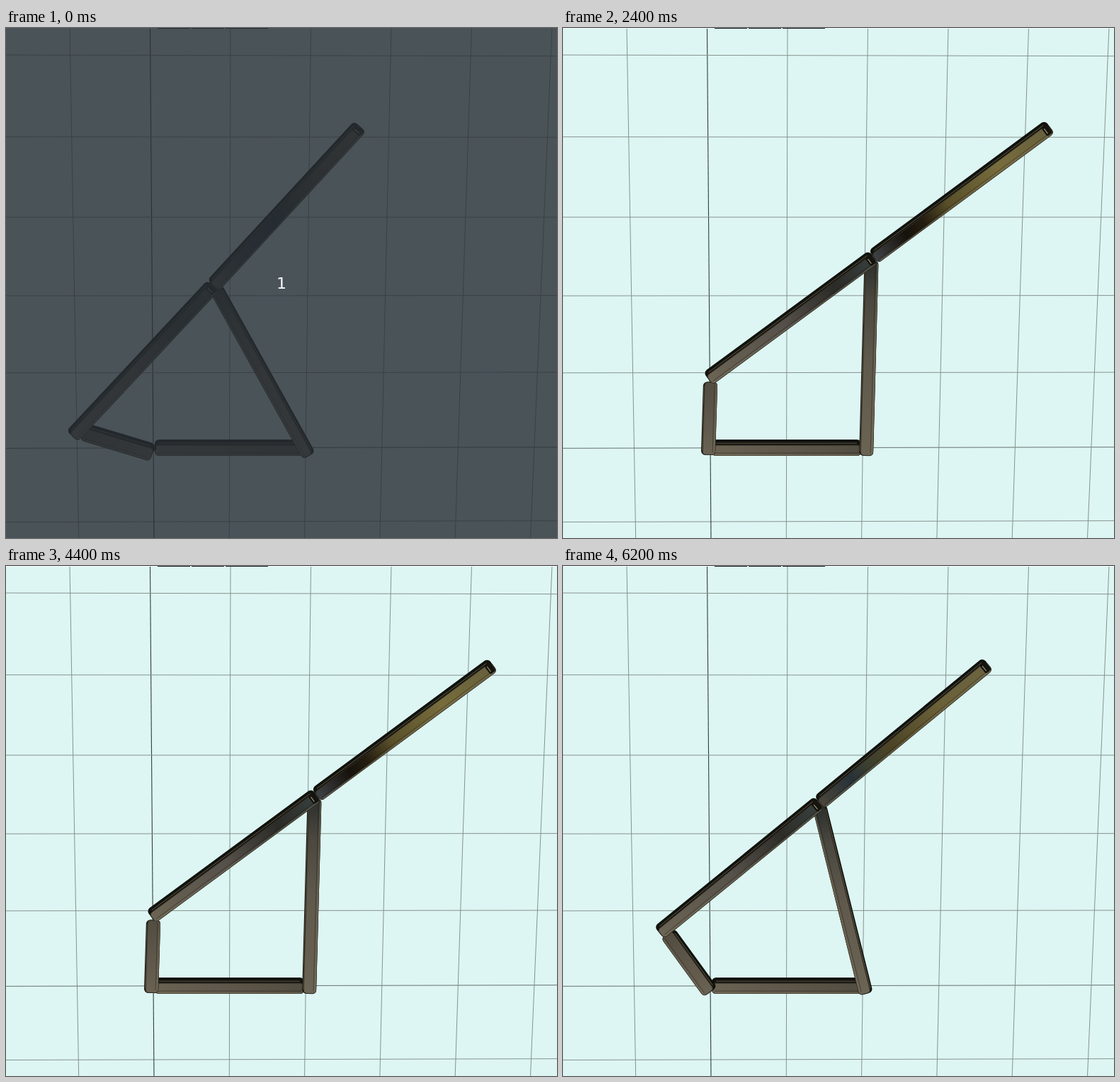
These frames come from a looping animation (778 px wide and 720 px high, 6.3 s). An HTML page:

```html
<!DOCTYPE html>
<html>
<head>
<meta charset="utf-8">
<title>Straight-line linkage</title>
<style>
html, body { margin: 0; width: 100%; height: 100%; overflow: hidden; background: #ddf6f3; }
svg { display: block; width: 778px; height: 720px; }
</style>
</head>
<body>
<svg id="stage" viewBox="0 0 778 720"></svg>
<script>
const NS = "http://www.w3.org/2000/svg";
const stage = document.getElementById("stage");
const LOOP = 6300, STEP = 100, TURN = 2000;

function set(el, attrs) {
  for (const k in attrs) el.setAttribute(k, attrs[k]);
  return el;
}
function add(parent, tag, attrs) {
  return parent.appendChild(set(document.createElementNS(NS, tag), attrs));
}

// Linkage units to stage pixels, on the tilted floor grid
function place([x, y]) {
  const sy = 593 - 105.3 * y - 1.15 * y * y;
  return [203.5 + sy * 5.5 / 720 + x * (113.5 - 7.2 * sy / 720), sy];
}

function drawGrid() {
  add(stage, "rect", { width: 778, height: 720, fill: "#ddf6f3" });
  for (let i = -1; i < 6; i++) {
    const axis = i === 0;
    add(stage, "line", {
      x1: 203.5 + 113.5 * i, y1: 0, x2: 209 + 106.3 * i, y2: 720,
      stroke: axis ? "#353d3d" : "#87928f", "stroke-width": axis ? 1.1 : 1
    });
    const y = place([0, i])[1];
    const tilt = [-1.8, -1.6, -0.8, -0.5, 0, 0.6, 1.6][i + 1];
    add(stage, "line", {
      x1: 0, y1: y + 0.3, x2: 778, y2: y + 0.3 + tilt,
      stroke: axis ? "#66706e" : "#87928f", "stroke-width": 1
    });
  }
  add(stage, "rect", { width: 778, height: 1, fill: "#f3fbfa" });
  for (const x of [214, 262, 310])
    add(stage, "rect", { x, y: 0, width: x === 310 ? 60 : 46, height: 1, fill: "#222" });
}

// A bevelled metal bar: dark upper side, shaded front, optional end cap
class Bar {
  constructor(id, width, stops, { cap = false, outside = false } = {}) {
    Object.assign(this, { width, outside });
    const grad = add(stage, "linearGradient", { id });
    this.stops = stops.map(([offset, color]) =>
      add(grad, "stop", { offset, "stop-color": color }));
    this.g = add(stage, "g", {});
    this.side = add(this.g, "rect", { rx: 6, fill: "#12120d" });
    this.sheen = add(this.g, "line", { stroke: "#6c6654", "stroke-width": 0.8 });
    this.front = add(this.g, "rect", {
      rx: 4.5, fill: `url(#${id})`, stroke: "#302c24", "stroke-width": 1
    });
    this.bevel = add(this.g, "line", { stroke: "#82775f", "stroke-width": 1.2, opacity: 0.7 });
    this.inner = add(this.g, "line", { stroke: "#1d1b16", "stroke-width": 0.8, opacity: 0.55 });
    if (cap) {
      this.cap = add(this.g, "rect", { rx: 3, width: 10, fill: "#15140f" });
      this.glint = add(this.g, "line", { stroke: "#9c9377", "stroke-width": 1.2 });
    }
  }
  move(a, b) {
    const dx = b[0] - a[0], dy = b[1] - a[1], len = Math.hypot(dx, dy);
    const angle = Math.atan2(dy, dx) * 180 / Math.PI;
    const flip = dx < 0 ? -1 : 1;
    const depth = 2 + 6 * Math.abs(dx) / len;
    const bottom = this.width / 2;
    const top = this.outside ? -bottom - depth : -bottom;
    const edge = top + depth;
    set(this.g, { transform: `translate(${a}) rotate(${angle}) scale(1 ${flip})` });
    set(this.side, { x: 0, y: top, width: len, height: bottom - top });
    set(this.sheen, { x1: 6, x2: len - 6, y1: top + depth * 0.65, y2: top + depth * 0.65 });
    set(this.front, { x: 0.5, y: edge, width: len - 1, height: bottom - edge - 0.5 });
    set(this.bevel, { x1: 4, x2: len - 4, y1: bottom - 1.2, y2: bottom - 1.2 });
    set(this.inner, { x1: 4, x2: len - 4, y1: bottom - 4, y2: bottom - 4 });
    if (this.cap) {
      set(this.cap, { x: len - 11, y: edge - 1, height: bottom - edge - 1 });
      set(this.glint, { x1: len - 8, x2: len - 8, y1: edge + 2, y2: bottom - 5 });
    }
  }
  paint(colors) {
    colors.forEach((c, i) => set(this.stops[i], { "stop-color": c }));
  }
}

const rgb = hex => [1, 3, 5].map(i => parseInt(hex.slice(i, i + 2), 16));
function mix(a, b, k) {
  const p = rgb(a), q = rgb(b);
  return `rgb(${p.map((v, i) => Math.round(v + (q[i] - v) * k))})`;
}

// Reflections along the upper bar through one turn
const offsets = [0, 0.18, 0.28, 0.42, 0.7, 1];
const shine = [
  [0, "#5a554a #2b3338 #262c30 #1c2226 #4a4030 #5a5238"],
  [200, "#4b463c #263238 #3c3f30 #4d4426 #6a6038 #6b6440"],
  [400, "#3f4245 #16120c #241d10 #594f2a #776c3c #665f3c"],
  [900, "#4a4538 #1e2a33 #262b2c #34322a #2e2712 #0e0e08"],
  [1600, "#5d5546 #686030 #d6d55c #46545a #565248 #4c5a58"],
  [2000, "#5a554a #2b3338 #262c30 #1c2226 #4a4030 #5a5238"]
].map(([at, list]) => ({ at, colors: list.split(" ") }));

function reflections(phase) {
  const i = shine.findIndex(s => s.at > phase);
  const a = shine[i - 1], b = shine[i];
  const k = (phase - a.at) / (b.at - a.at);
  return a.colors.map((c, j) => mix(c, b.colors[j], k));
}

drawGrid();
const plain = [[0, "#6a6353"], [0.5, "#5e574a"], [1, "#524d41"]];
const ground = new Bar("ground", 23, plain);
add(stage, "circle", { cx: 207.5, cy: 593, r: 5, fill: "#11110d" });
const crank = new Bar("crank", 18, plain, { outside: true });
const rocker = new Bar("rocker", 20, [[0, "#6b6454"], [0.5, "#5f594c"], [0.8, "#4a483f"], [1, "#2b2f2c"]]);
const coupler = new Bar("coupler", 22, [[0, "#6b6454"], [0.45, "#5a5448"], [0.76, "#2d2d28"], [1, "#394240"]], { cap: true });
const upper = new Bar("upper", 22.5, offsets.map(o => [o, "#555"]), { cap: true });
ground.move([210, 592.5], [421, 592.5]);

const dot = add(stage, "g", {});
add(dot, "circle", { cx: 354.5, cy: 332.5, r: 5.7, fill: "#f2563a" });
add(dot, "circle", { cx: 353.5, cy: 331, r: 2.6, fill: "#ff7a58" });

const countdown = add(stage, "g", {});
add(countdown, "rect", { width: 778, height: 720, fill: "#282e34", opacity: 0.81 });
add(countdown, "text", {
  x: 389, y: 368, "text-anchor": "middle", "font-size": 22, fill: "#fff",
  "font-family": "'DejaVu Sans', sans-serif"
}).textContent = "1";

// Crank 1, base 2, rocker 2.5, coupler 2.5 + 2.5
function solve(angle) {
  const c = [Math.cos(angle), Math.sin(angle)];
  const dx = 2 - c[0], dy = -c[1], d = Math.hypot(dx, dy);
  const h = Math.sqrt(6.25 - d * d / 4) / d;
  const j = [c[0] + dx / 2 - dy * h, c[1] + dy / 2 + dx * h];
  return { c, j, p: [2 * j[0] - c[0], 2 * j[1] - c[1]] };
}

function render(time) {
  const step = Math.floor((time % LOOP) / STEP + 0.001);
  const phase = step * STEP % TURN;
  const { c, j, p } = solve((162 - 0.18 * phase) * Math.PI / 180);
  const C = place(c), J = place(j), P = place(p);
  const ux = (j[0] - c[0]) / 2.5, uy = (j[1] - c[1]) / 2.5;
  const lift = y => 0.06 * (y - 330);

  // Front faces sit nearer the camera than the floor grid
  const low = [C[0] + 0.08 * (C[0] - 207) + 8 * ux - 9, C[1] + lift(C[1]) + 22 * (uy - 0.6) - 1];
  const mid = [J[0] + 0.03 * (J[0] - 330) + 16 * ux - 4, J[1] + lift(J[1]) + 1];
  const tip = [P[0] + 0.03 * (P[0] - 330) + 40 * ux - 7, P[1] + lift(P[1]) - 3.5];

  crank.move([206, 603], [C[0] + 2, C[1] + 13]);
  rocker.move([428, 604], [J[0] + 9, J[1] + 6]);
  coupler.move(low, mid);
  upper.move(mid, tip);

  const dark = Math.max(0, Math.min(1, (ux - 0.2) / 0.6));
  coupler.paint(["#6b6454", mix("#645d4e", "#55504a", dark), mix("#58523f", "#2b2b27", dark), mix("#4a4a40", "#37403f", dark)]);
  upper.paint(reflections(phase));

  set(countdown, { visibility: step === 0 ? "visible" : "hidden" });
  set(dot, { visibility: step >= 3 && step <= 14 ? "visible" : "hidden" });
}

function tick() {
  render(performance.now());
  requestAnimationFrame(tick);
}
tick();
</script>
</body>
</html>
```
